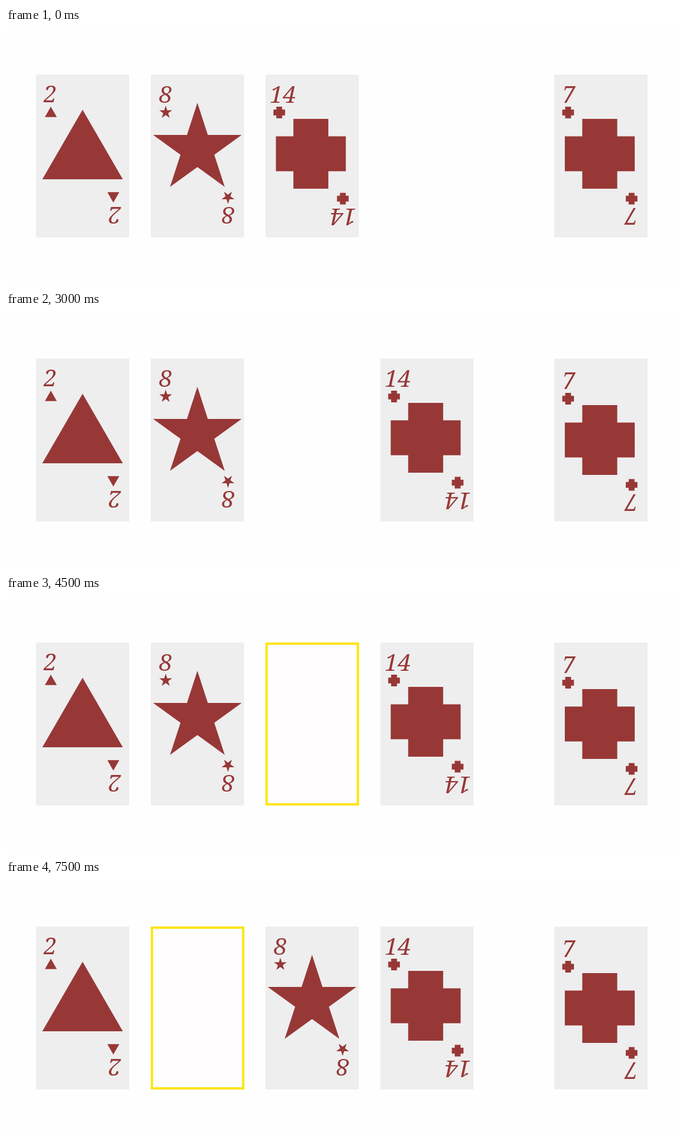
Recreate the animation shown at these times as an HTML page. Size 1211x462 px, loop 8 s.

```html
<!DOCTYPE html>
<html lang="en">
<head>
<meta charset="utf-8">
<title>Sorting cards</title>
<style>
  html, body { margin: 0; width: 100%; height: 100%; overflow: hidden; background: #fefefe; }
  svg { display: block; }
  text { font: italic 42px "Noto Serif", serif; text-anchor: middle; }
</style>
</head>
<body>
<svg id="stage" width="1211" height="462" viewBox="0 0 1211 462" fill="#973837"></svg>
<script>
const stage = document.getElementById("stage");
const STEP = 1500, LOOP = 8000;
const slots = [54, 261, 467.6, 674.5];
const HELD_X = 988;

// Shapes are drawn around their own centre at full size.
const star = Array.from({ length: 10 }, (_, i) => {
  const r = i % 2 ? 32 : 83.9, a = i * Math.PI / 5;
  return [r * Math.sin(a), -r * Math.cos(a)];
}).join(" ");
const triangle = "0,-83.7 72.5,41.8 -72.5,41.8";
const a = 31.5, b = 63;
const cross = [-a, -b, a, -b, a, -a, b, -a, b, a, a, a, a, b, -a, b, -a, a, -b, a, -b, -a, -a, -a].join(" ");

const polygon = (points, x, y, scale = 1) =>
  `<polygon points="${points}" transform="translate(${x} ${y}) scale(${scale})"/>`;

function card({ label, points, center, icon, scale, text, pivot }) {
  const number = `<text x="${text[0]}" y="${text[1]}">${label}</text>`;
  const small = polygon(points, ...icon, scale);
  const turn = (x, content) => `<g transform="rotate(180 ${x} ${pivot[2]})">${content}</g>`;
  const group = document.createElementNS(stage.namespaceURI, "g");
  group.innerHTML = `<rect y="84" width="168" height="294" fill="#eee"/>
    <g>${polygon(points, ...center)}${number}${small}
    ${turn(pivot[0], number)}${turn(pivot[1], small)}</g>`;
  stage.append(group);
  return group;
}

// pivot: x for the number, x for the icon, shared y
const two = card({ label: "2", points: triangle, center: [84, 231.2], icon: [26.8, 154.5],
  scale: 0.148, text: [25.7, 134], pivot: [83.3, 83.1, 228.5] });
const eight = card({ label: "8", points: star, center: [83.9, 218.9], icon: [26.8, 152.3],
  scale: 0.145, text: [26.6, 134.5], pivot: [82.8, 82.9, 228.8] });
const fourteen = card({ label: "14", points: cross, center: [81.8, 227], icon: [24.8, 152.5],
  scale: 1 / 6, text: [31.4, 134.5], pivot: [85.6, 82.1, 230.2] });
const seven = card({ label: "7", points: cross, center: [82, 227], icon: [25, 152.5],
  scale: 1 / 6, text: [26, 135], pivot: [82.4, 82.2, 230.2] });

const gap = document.createElementNS(stage.namespaceURI, "g");
gap.innerHTML = `<rect x="2" y="86" width="164.5" height="290" fill="#fffdfe" stroke="#fce510" stroke-width="4.2"/>`;
stage.append(gap);

const moveTo = (node, x, y = 0) => node.setAttribute("transform", `translate(${x} ${y})`);

function draw(now) {
  const step = Math.floor(now % LOOP / STEP);
  moveTo(two, slots[0]);
  moveTo(eight, slots[step < 4 ? 1 : 2]);
  moveTo(fourteen, slots[step < 2 ? 2 : 3]);
  moveTo(seven, HELD_X);
  moveTo(seven.lastElementChild, 0, step < 2 ? 0 : 4);
  // The empty slot is highlighted on every second step, moving left.
  gap.style.display = step % 2 ? "" : "none";
  moveTo(gap, slots[3 - (step >> 1)]);
  requestAnimationFrame(draw);
}
draw(performance.now());
</script>
</body>
</html>
```
